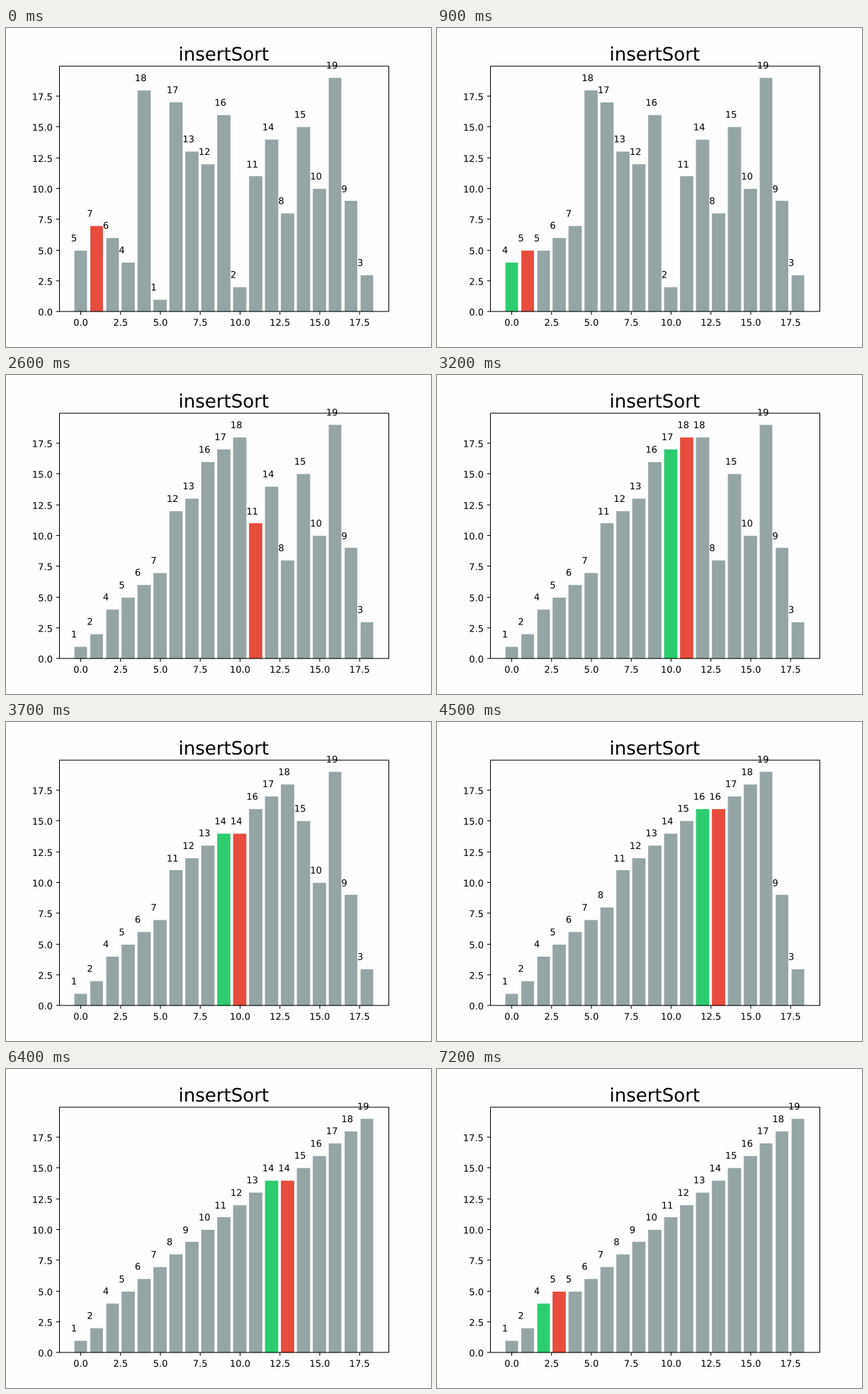
Recreate the animation shown at these times as a matplotlib script. Size 600 by 450 pixels, loop 7300 ms.

```python
import math

import matplotlib.pyplot as plt
from matplotlib.animation import FuncAnimation
from matplotlib.patches import Rectangle
from matplotlib.patheffects import Normal

START = [5, 7, 6, 4, 18, 1, 17, 13, 12, 16, 2, 11, 14, 8, 15, 10, 19, 9, 3]
GREY, RED, GREEN = "#95a5a6", "#e74c3c", "#2ecc71"
FRAMES, INTERVAL = 73, 100

# The chart is laid out on a 640 x 480 grid that fills the 600 x 450 stage.
GRID_W, GRID_H = 640, 480
LEFT, RIGHT, BOTTOM, TOP = 80, 576, 52.8, 422.4
X_MIN, X_MAX, Y_MAX = -1.34, 19.34, 19.95
TICK = 5


def snap(value):
    return math.floor(value + 0.5)


def grid_x(x):
    return snap(LEFT + (x - X_MIN) * (RIGHT - LEFT) / (X_MAX - X_MIN))


def grid_y(y):
    return snap(BOTTOM + y * (TOP - BOTTOM) / Y_MAX)


def insertion_steps(values):
    """Yield (values, active index, compared index) for every sorting step."""
    a = list(values)
    for i in range(1, len(a)):
        key, j = a[i], i
        yield a[:], i, None
        while j > 0 and a[j - 1] > key:
            yield a[:], j, j - 1
            a[j] = a[j - 1]
            yield a[:], j, j - 1
            j -= 1
        a[j] = key


plt.rcParams["path.snap"] = False
fig = plt.figure(figsize=(6.4, 4.8), dpi=93.75, facecolor="#fefefe")
ax = fig.add_axes([0, 0, 1, 1])
ax.set_xlim(0, GRID_W)
ax.set_ylim(0, GRID_H)
ax.axis("off")


def write(x, y, text, size=10, ha="left"):
    # The path effect draws glyph outlines, so text is not moved to whole pixels
    return ax.text(x, y, text, fontsize=size, ha=ha, va="baseline",
                   path_effects=[Normal()])


def rule(xs, ys):
    ax.plot(xs, ys, color="black", lw=0.8, solid_capstyle="butt")


def draw_axes():
    x0, y0 = LEFT + 0.5, snap(BOTTOM) + 0.5
    ax.add_patch(Rectangle((x0, y0), RIGHT - LEFT, snap(TOP) - snap(BOTTOM),
                           fill=False, lw=0.8, zorder=3))
    for i in range(8):
        t = 2.5 * i
        x, y = grid_x(t) + 0.5, grid_y(t) + 0.5
        rule([x, x], [y0, y0 - TICK])
        rule([x0, x0 - TICK], [y, y])
        write(x, 32, f"{t:.1f}", ha="center")
        write(70.3, grid_y(t) - 5.5, f"{t:.1f}", ha="right")
    write((LEFT + RIGHT) / 2, 431, "insertSort", size=20, ha="center")


def make_bar(i):
    left, base = grid_x(i - 0.4), grid_y(0)
    return ax.add_patch(Rectangle((left, base), grid_x(i + 0.4) - left, 0, lw=0))


steps = list(insertion_steps(START))
draw_axes()
bars = [make_bar(i) for i in range(len(START))]
labels = [write(grid_x(i - 0.6), 0, "") for i in range(len(START))]


def draw(frame):
    # 24 sorting steps per second, shown at 10 frames per second
    values, active, compared = steps[frame * 12 // 5]
    for i, (bar, label, v) in enumerate(zip(bars, labels, values)):
        bar.set_height(grid_y(v) - grid_y(0))
        bar.set_facecolor(RED if i == active else GREEN if i == compared else GREY)
        label.set_y(grid_y(v + 0.75))
        label.set_text(str(v))
    return [*bars, *labels]


anim = FuncAnimation(fig, draw, frames=FRAMES, interval=INTERVAL,
                     repeat=True, repeat_delay=0)
plt.show()
```
